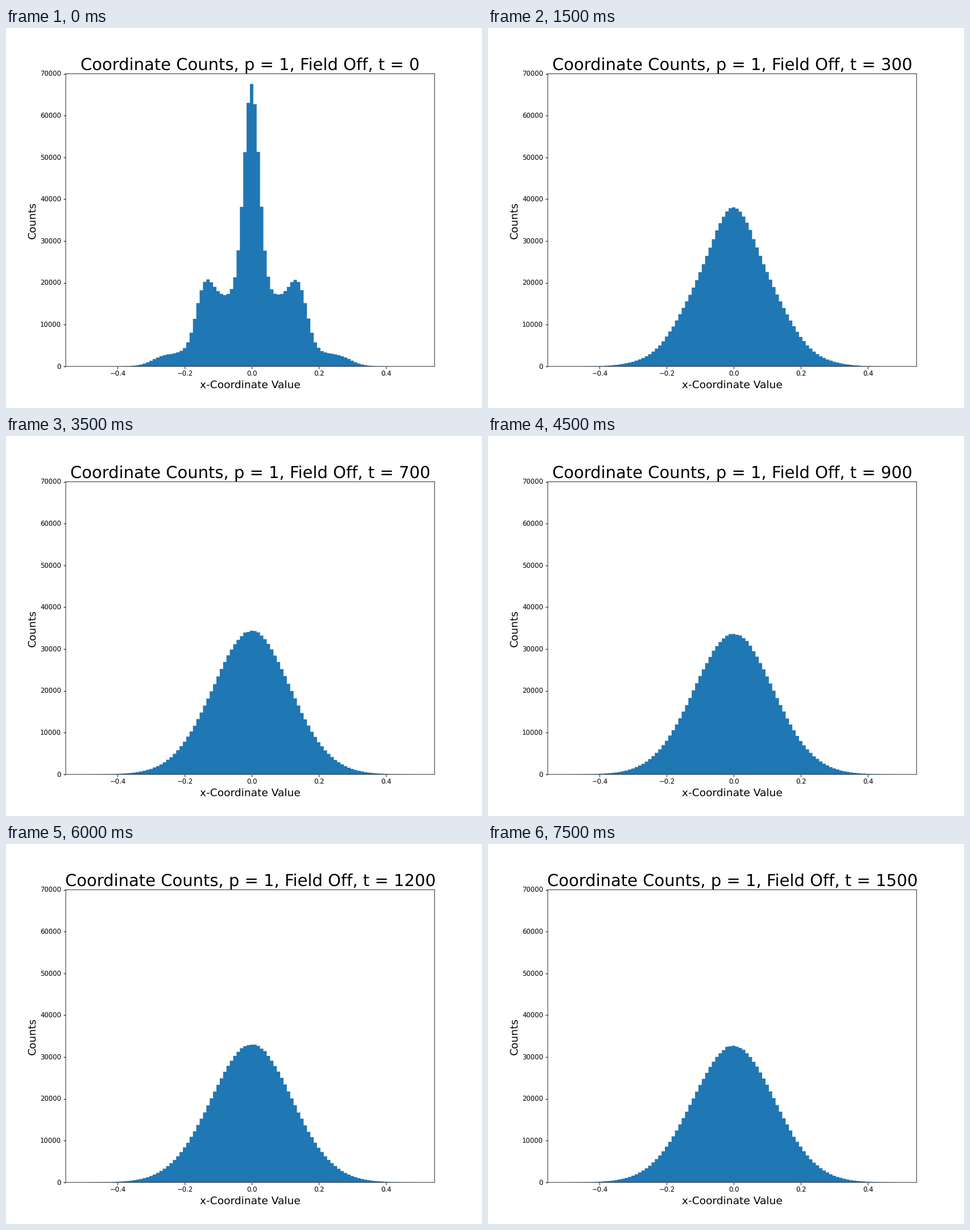
Write a matplotlib script that moves like this. It is 837x669 px and loops after 8000 ms.

```python
import numpy as np
import matplotlib.pyplot as plt
from matplotlib.animation import FuncAnimation

DPI = 83.7
FRAMES, INTERVAL, STEP = 16, 500, 100
BIN = 0.01
TOTAL = 1e6  # particles in the histogram
SHIFT = 0.0007  # bars sit half a pixel left of the ticks

plt.rcParams.update({
    "path.snap": False,
    "text.hinting": "none",
    "axes.linewidth": 0.72,
})

k = np.arange(-100, 101)  # bin offsets, wider than the plot for smoothing
shown = slice(50, 150)
edges = (np.arange(101) - 50.5) * BIN - SHIFT


def gauss(x, sigma):
    return np.exp(-0.5 * (x / sigma) ** 2)


def plateau(half_width, softness):
    return 1 / (1 + np.exp((np.abs(k) - half_width) / softness))


# Dense core, a wide body with raised rims, and a faint halo
start = (50650 * gauss(k, 2.28)
         + 13700 * plateau(17, 1.3)
         + 4700 * gauss(np.abs(k) - 13.6, 2.2)
         + 3150 * plateau(29.5, 2))


def counts(t):
    """Start profile diffuses while it gives way to a widening bell curve."""
    kernel = gauss(k, np.sqrt(0.08 * t) + 1e-3)
    diffused = np.convolve(start, kernel / kernel.sum(), mode="same")
    sigma = 12.5 - 3 * np.exp(-t / 700)
    bell = TOTAL / (sigma * np.sqrt(2 * np.pi)) * gauss(k, sigma)
    w = np.exp(-t / 430)
    n = (w * diffused + (1 - w) * bell)[shown]
    noise = np.random.default_rng(t + 7).normal(size=n.size)
    return np.clip(n + 0.4 * np.sqrt(n) * noise, 0, None)


fig, ax = plt.subplots(figsize=(837.0001 / DPI, 669.0001 / DPI), dpi=DPI)
# Default margins, moved half a pixel right and down
fig.subplots_adjust(left=0.1255, right=0.9005, bottom=0.1094, top=0.8794)
hist = ax.stairs(counts(0), edges, fill=True, color="#1f77b4")
ax.set_xlim(-0.555, 0.545)
ax.set_ylim(0, 70000)
ax.set_xlabel("x-Coordinate Value", fontsize=16)
ax.set_ylabel("Counts", fontsize=16)
title = ax.set_title("", fontsize=25)


def update(i):
    t = i * STEP
    hist.set_data(values=counts(t))
    title.set_text(f"Coordinate Counts, p = 1, Field Off, t = {t}")
    return hist, title


anim = FuncAnimation(fig, update, frames=FRAMES, interval=INTERVAL,
                     repeat=True, repeat_delay=0, blit=False)
plt.show()
```
